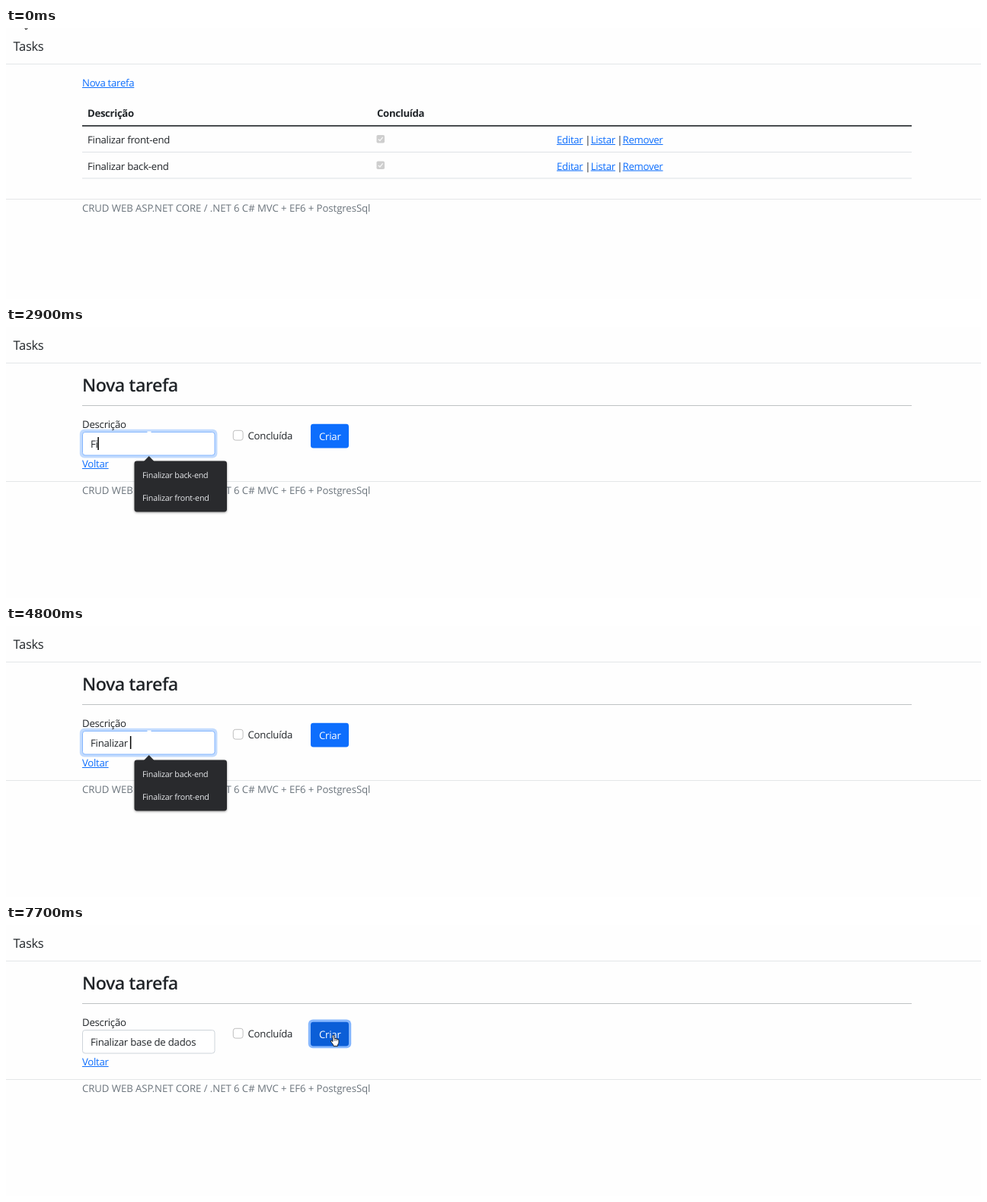
Animation of 1280x357 px, one loop 8000 ms. Source, as an HTML page with a canvas:

```html
<!DOCTYPE html>
<html lang="pt">
<head>
<meta charset="utf-8">
<title>Tasks</title>
<style>
html, body { margin: 0; width: 100%; height: 100%; overflow: hidden; background: #fefefe; }
canvas { display: block; width: 100vw; height: 100vh; }
</style>
</head>
<body>
<canvas id="stage" width="1280" height="357"></canvas>
<script>
const ctx = document.getElementById('stage').getContext('2d');
const LOOP = 8000, STEP = 100;
const INK = '#212529', BLUE = '#0d6efd', MUTED = '#6c757d', RULE = '#dee2e6';
const FRONT = 'Finalizar front-end', BACK = 'Finalizar back-end';

// [start ms, value]: the last entry that has begun is in force
const typed = [
  [0, ''], [2700, 'F'], [2900, 'Fi'], [3300, 'Fin'], [3600, 'Finl'], [3800, 'Fin'], [3900, 'Fina'],
  [4200, 'Final'], [4300, 'Finali'], [4400, 'Finaliz'], [4500, 'Finaliza'], [4600, 'Finalizar'],
  [4800, 'Finalizar '], [4900, 'Finalizar b'], [5000, 'Finalizar ba'], [5100, 'Finalizar bas'],
  [5300, 'Finalizar base'], [5400, 'Finalizar base '], [5600, 'Finalizar base d'],
  [5700, 'Finalizar base de'], [5800, 'Finalizar base de '], [5900, 'Finalizar base de d'],
  [6000, 'Finalizar base de da'], [6100, 'Finalizar base de dad'], [6200, 'Finalizar base de dados']
];
const hints = [
  [0, []], [2000, ['Teste', FRONT, BACK]], [2700, [FRONT, BACK]], [2900, [BACK, FRONT]],
  [4900, [BACK]]
];
const hintAlpha = [
  [0, 0], [2000, 0.35], [2100, 0.7], [2200, 1], [3600, 0.66], [3700, 0],
  [3900, 0.66], [4000, 1], [5100, 0.66], [5200, 0]
];

const at = (list, t) => list.findLast(([start]) => start <= t)[1];
const clamp = v => Math.max(0, Math.min(1, v));
const ramp = (t, from, to) => clamp((t - from) / (to - from));

function text(str, x, y, { size = 13.2, weight = 400, color = INK, track = -0.018 } = {}) {
  ctx.font = `${weight} ${size}px "Open Sans", "Noto Sans", sans-serif`;
  ctx.letterSpacing = `${(track * size).toFixed(3)}px`;
  ctx.textRendering = 'geometricPrecision';
  ctx.fillStyle = color;
  ctx.fillText(str, x, y);
  return ctx.measureText(str).width;
}

function rect(x, y, w, h, color) {
  ctx.fillStyle = color;
  ctx.fillRect(x, y, w, h);
}

function box(x, y, w, h, r, fill, stroke, line = 1) {
  ctx.beginPath();
  ctx.roundRect(x, y, w, h, r);
  if (fill) { ctx.fillStyle = fill; ctx.fill(); }
  if (stroke) { ctx.strokeStyle = stroke; ctx.lineWidth = line; ctx.stroke(); }
}

function link(str, x, y) {
  const w = text(str, x, y, { color: BLUE, track: -0.021 });
  rect(x, y + 1, w, 1, BLUE);
}

function poly(points, fill, stroke, line) {
  ctx.beginPath();
  points.forEach(([x, y]) => ctx.lineTo(x, y));
  ctx.closePath();
  ctx.fillStyle = fill;
  ctx.fill();
  if (stroke) { ctx.strokeStyle = stroke; ctx.lineWidth = line; ctx.stroke(); }
}

function frame(footerY) {
  rect(0, 0, 1280, 357, '#fefefe');
  text('Tasks', 9.5, 30, { size: 16.5 });
  rect(0, 47, 1280, 1, '#e4e6e8');
  rect(0, footerY, 1280, 1, '#e4e6e8');
  text('CRUD WEB ASP.NET CORE / .NET 6 C# MVC + EF6 + PostgresSql', 100, footerY + 16.5,
    { color: MUTED, track: -0.005 });
}

function checkedBox(x, y) {
  box(x, y, 10.5, 10.5, 1.8, '#cecece');
  ctx.beginPath();
  ctx.moveTo(x + 2.3, y + 5.4);
  ctx.lineTo(x + 4.4, y + 7.5);
  ctx.lineTo(x + 8.2, y + 2.9);
  ctx.strokeStyle = '#f6f6f6';
  ctx.lineWidth = 1.4;
  ctx.stroke();
}

function row(name, y) {
  text(name, 107, y);
  checkedBox(486.5, y - 11);
  link('Editar', 723, y);
  text('|', 760.3, y);
  link('Listar', 767.7, y);
  text('|', 802.3, y);
  link('Remover', 809.5, y);
  rect(100, y + 11, 1089, 1, RULE);
}

function listPage() {
  frame(225);
  link('Nova tarefa', 100, 77);
  const head = { weight: 700, track: -0.025 };
  text('Descrição', 107, 117, head);
  text('Concluída', 487, 117, head);
  rect(100, 128, 1089, 1.7, '#2b2f33');
  row(FRONT, 152);
  row(BACK, 186.5);
}

function field(t) {
  const focus = ramp(t, 2200, 2400) * (1 - ramp(t, 7300, 7500));
  if (focus) box(96.8, 134.8, 180.6, 37.6, 6, `rgba(194,219,254,${focus})`);
  box(100.5, 138.5, 173.5, 30.5, 3.4, '#fff', focus > 0.5 ? '#86b7fe' : '#ced4da');
  if (t >= 1800 && t < 6700) rect(185.5, 137.5, 5, 2, '#fdfdfd');
  const w = text(at(typed, t), 111, 158.5);
  if (t >= 2000 && t < 7400) rect(110.7 + w, 145, 1.5, 17, '#000');
}

function popup(t) {
  const alpha = at(hintAlpha, t);
  if (!alpha) return;
  const rows = at(hints, t), h = 31 * rows.length + 5, w = rows.length > 2 ? 122 : 121.5;
  ctx.save();
  ctx.globalAlpha = alpha;
  if (alpha < 1) {
    ctx.translate(229, 210);
    ctx.scale(0.975, 0.985);
    ctx.translate(-229, -210);
  }
  ctx.shadowColor = 'rgba(0,0,0,.4)';
  ctx.shadowBlur = 3;
  ctx.shadowOffsetY = 1;
  box(168.5, 176.5, w, h, 3.4, '#292a2d');
  ctx.shadowColor = 'transparent';
  poly([[181, 177], [187.7, 170], [194.4, 177]], '#292a2d');
  rows.forEach((name, i) => text(name, 179, 199 + 30.2 * i, { size: 10.7, color: '#e8eaed' }));
  ctx.restore();
}

function button(t) {
  const ring = ramp(t, 7400, 7600);
  if (ring) box(396.8, 124.4, 56.4, 37.8, 6, `rgba(134,183,254,${ring})`);
  box(400, 127.8, 50, 31.6, 3.4, t >= 7200 ? '#0b5ed7' : BLUE);
  text('Criar', 411, 148.5, { color: '#fff' });
}

function formPage(t) {
  frame(203);
  text('Nova tarefa', 100, 85, { size: 23.3, weight: 600, track: -0.023 });
  rect(100, 103, 1089, 1, '#bfc2c4');
  field(t);
  text('Descrição', 100, 133);
  box(298.3, 136.3, 12.8, 12.8, 3, '#fff', '#bfbfbf');
  text('Concluída', 317.5, 148);
  button(t);
  link('Voltar', 100, 185);
  popup(t);
}

function arrow(x, y) {
  ctx.save();
  ctx.translate(x, y);
  poly([[0.5, 0.5], [0.5, 13], [3.4, 10.3], [5.3, 15], [7.4, 14.1], [5.5, 9.6], [9.3, 9.6]], '#fff', '#111', 0.9);
  ctx.restore();
}

function hand(x, y) {
  ctx.save();
  ctx.translate(x, y);
  ctx.lineJoin = 'round';
  poly([[-1, 0.5], [0, -0.3], [1, 0.5], [1.2, 4.6], [3, 4.6], [4.8, 5.2], [6.4, 5.9], [7, 7],
    [6.8, 10.5], [5.6, 12.6], [5.4, 14.6], [0, 14.6], [-0.4, 12.8], [-2.8, 9.6], [-3.8, 7.8],
    [-2.8, 7], [-1, 8.6]], '#fff', '#111', 0.9);
  ctx.strokeStyle = '#111';
  ctx.lineWidth = 0.6;
  ctx.beginPath();
  [1.3, 3.1, 4.9].forEach(dx => { ctx.moveTo(dx, 5.2); ctx.lineTo(dx, 7.8); });
  ctx.stroke();
  ctx.restore();
}

function pointer(t) {
  if (t < 1200) {
    const p = ramp(t, 0, 600), e = p * p * (3 - 2 * p);
    const x = 20.5 + 114.5 * e, y = -13 + 85 * e;
    (x > 100 && y > 64 ? hand : arrow)(x, y);
  } else if (t >= 1500 && t < 1800) {
    arrow(187.3, t < 1700 ? 121 : 128);
  } else if (t >= 6700) {
    const p = ramp(t, 6600, 7200), q = 1 - p;
    const x = 189 * q * q + 2 * 305 * p * q + 430 * p * p;
    const y = 146 * q * q + 2 * 192 * p * q + 145 * p * p;
    if (t >= 7200) hand(x, y);
    else if (x > 274 || y > 169) arrow(x, y);
  }
}

function draw(now) {
  const t = Math.floor((now % LOOP) / STEP) * STEP;
  if (t < 1200) listPage(); else formPage(t);
  pointer(t);
}

const start = performance.now();
function tick() {
  draw(performance.now() - start);
  requestAnimationFrame(tick);
}
tick();
</script>
</body>
</html>
```
